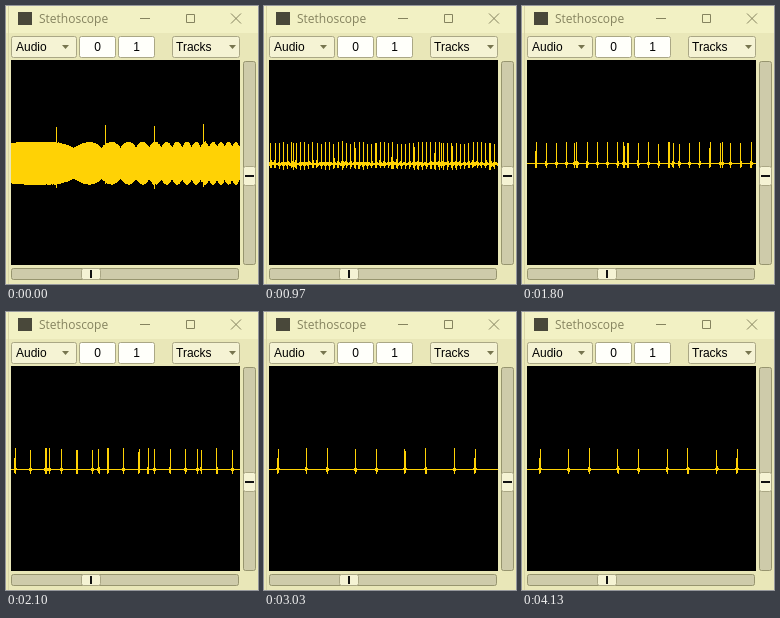
These frames come from a looping animation (252 px wide and 278 px high, 4160 ms). An HTML page:

```html
<!DOCTYPE html>
<html lang="en">
<head>
<meta charset="utf-8">
<title>Stethoscope</title>
<style>
  html, body { margin: 0; width: 100%; height: 100%; overflow: hidden; background: #e9e7b8; }
  svg { display: block; width: 252px; height: 278px; }
  text { font: 12px "Liberation Sans", Arial, sans-serif; fill: #000; }
  .title { font-family: "Open Sans", "Noto Sans", sans-serif; fill: #85835f; }
  .glyph { fill: none; stroke: #85835f; }
  .button, .thumb { fill: #f5f3d4; stroke: #aaa785; }
  .field { fill: #fffffa; stroke: #aaa785; }
  .track { fill: #cecbaa; stroke: #97956f; }
  .arrow { fill: #77754f; }
  .mark { fill: #111; }
</style>
</head>
<body>
<svg viewBox="0 0 252 278">
  <rect width="252" height="278" fill="#e9e7b8"/>
  <rect width="252" height="27" fill="#f2f1c4"/>
  <path d="M2.5 0V278" stroke="#d8d5a6"/>

  <rect x="12" y="6" width="14" height="13" fill="#49483a"/>
  <text class="title" x="33" y="17">Stethoscope</text>
  <path class="glyph" d="M134 12.5h10M180.5 8.5h8v8h-8zM225 7.5l10 10M235 7.5l-10 10"/>

  <rect class="button" x="5.5" y="30.5" width="65" height="21" rx="2"/>
  <text x="10" y="45">Audio</text>
  <path class="arrow" d="M56 39h7l-3.5 4z"/>
  <rect class="field" x="73.5" y="30.5" width="36" height="21" rx="2"/>
  <text x="91.5" y="45" text-anchor="middle">0</text>
  <rect class="field" x="112.5" y="30.5" width="36" height="21" rx="2"/>
  <text x="130.5" y="45" text-anchor="middle">1</text>
  <rect class="button" x="166.5" y="30.5" width="67" height="21" rx="2"/>
  <text x="170" y="45">Tracks</text>
  <path class="arrow" d="M223 39h7l-3.5 4z"/>

  <rect class="track" x="237.5" y="55.5" width="12" height="203" rx="2"/>
  <rect class="thumb" x="237.5" y="160.5" width="12" height="19" rx="2"/>
  <rect class="mark" x="239" y="169" width="9" height="2"/>
  <rect class="track" x="5.5" y="262.5" width="227" height="11" rx="2"/>
  <rect class="thumb" x="75.5" y="262.5" width="19" height="11" rx="2"/>
  <rect class="mark" x="84" y="264" width="2" height="8"/>

  <rect x="5" y="54" width="229" height="205" fill="#000"/>
  <path id="wave" fill="#ffd205" shape-rendering="crispEdges"/>
</svg>
<script>
const LOOP = 4160, STEP = LOOP / 125;
const LEFT = 5, RIGHT = 234, BASE = 157.5, GAIN = 21;
const RATE = 18;            // audio samples per pixel
const STEADY = 49.25;       // period of the fixed pulse train, px
const HOP = STEADY / 3;     // its shift per refresh

// step, sweeping period (px), lead over the fixed train, drift, ringing
const KEYS = [
  [0, 4 / RATE, 29.3, 0.7, 0],
  [16, 2.9, 1, 8.1, 0.2],
  [29, 4.2, 2.5, -3.3, 0.04],
  [54, 10.2, 10.6, 3.4, 0],
  [74, 25.7, 19.7, -16.8, 0],
  [91, STEADY, 28.2, -2.4, 0],
  [124, STEADY, 28.5, 1.6, 0]
];

const wave = document.getElementById("wave");
const mix = (a, b, u) => a + (b - a) * u;

function settings(step) {
  const i = Math.max(1, KEYS.findIndex(key => key[0] >= step));
  const a = KEYS[i - 1], b = KEYS[i];
  const u = (step - a[0]) / (b[0] - a[0]);
  return {
    period: a[1] * (b[1] / a[1]) ** u,
    lead: mix(a[2], b[2], u),
    drift: mix(a[3], b[3], u),
    ring: mix(a[4], b[4], u)
  };
}

// Band-limited impulse train; phase in cycles.
function blip(phase, harmonics) {
  const angle = Math.PI * (phase - Math.round(phase));
  if (Math.abs(angle) < 1e-7) return 1;
  return (Math.sin((2 * harmonics + 1) * angle) / Math.sin(angle) - 1) / (2 * harmonics);
}

const harmonicsFor = period => Math.max(1, Math.min(200, Math.floor(period * RATE / 3.8)));

function draw(step) {
  const { period, lead, drift, ring } = settings(step);
  const fixedAt = (step * HOP) % STEADY + drift;
  const sweepAt = fixedAt + lead;
  const sweepCount = harmonicsFor(period), fixedCount = harmonicsFor(STEADY);

  const level = i => {
    const x = LEFT + i / RATE, d = x - sweepAt;
    const sweep = blip((d - 1.95e-5 * d * d) / period, sweepCount);
    const fixed = blip((x - fixedAt) / STEADY, fixedCount);
    const hum = ring * (i % 2 ? -1 : 1) * (0.8 + 0.2 * Math.sin(x / 3)) * (1 - sweep);
    return BASE - GAIN * (sweep + fixed + hum);
  };

  let path = "", last = level(0), i = 0;
  for (let x = LEFT; x < RIGHT; x++) {
    let top = last, bottom = last;
    for (let n = 0; n < RATE; n++) {
      last = level(i++);
      top = Math.min(top, last);
      bottom = Math.max(bottom, last);
    }
    const y = Math.floor(top);
    path += `M${x} ${y}h1V${Math.max(y + 1, Math.round(bottom))}h-1z`;
  }
  wave.setAttribute("d", path);
}

let shown = -1;
function tick() {
  const step = Math.min(124, Math.floor((performance.now() % LOOP + 5) / STEP));
  if (step !== shown) draw(shown = step);
  requestAnimationFrame(tick);
}
tick();
</script>
</body>
</html>
```
